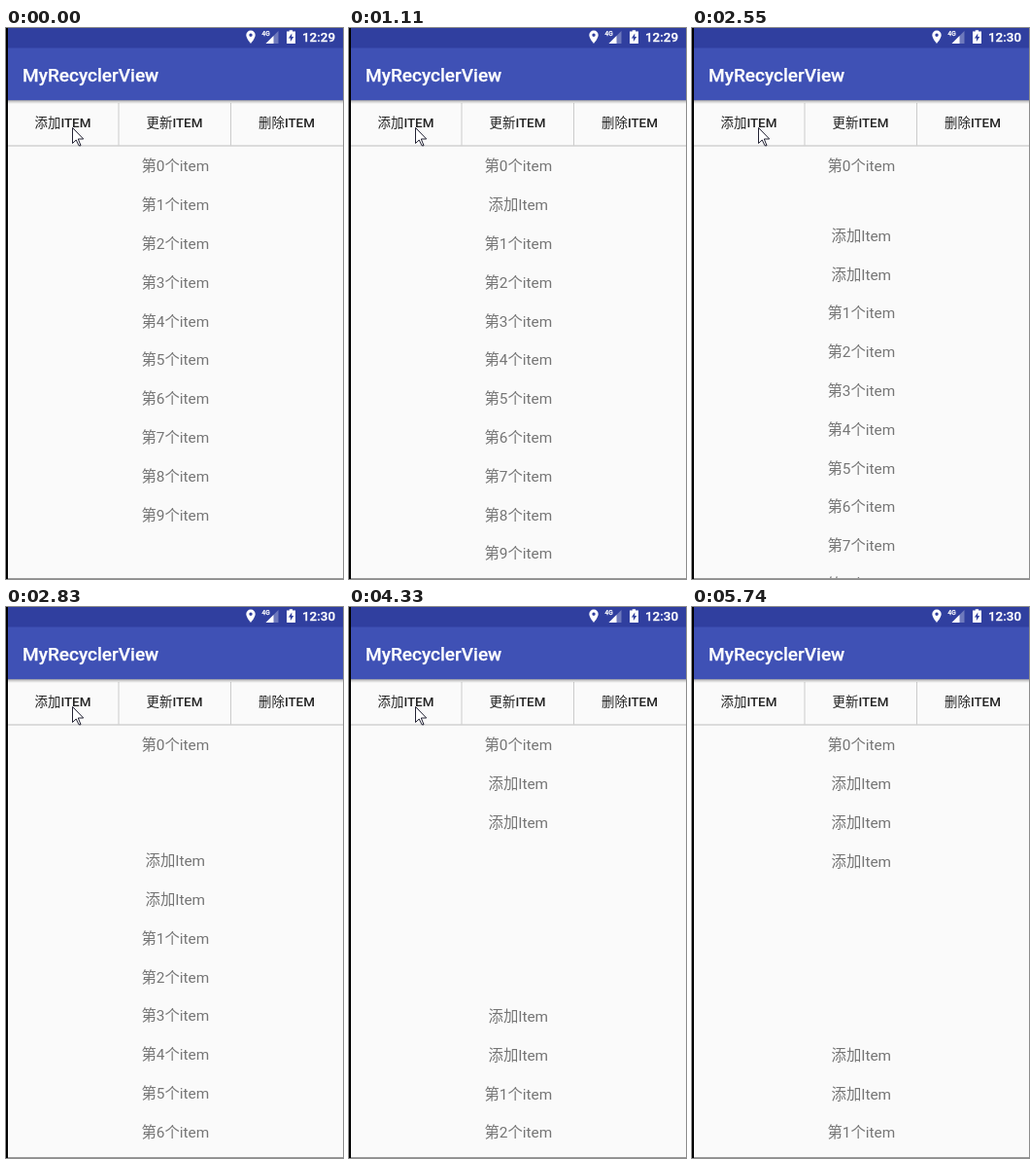
An HTML page that plays this animation: 347x566 px, repeating every 6300 ms.

```html
<!DOCTYPE html>
<html lang="zh-CN">
<head>
<meta charset="utf-8">
<style>
  html, body { margin: 0; width: 347px; height: 566px; overflow: hidden; background: #fafafa; }
  svg { display: block; font-family: Roboto, "Noto Sans CJK SC", "Noto Sans CJK", sans-serif; }
  .bar { fill: #fff; font-weight: 500; }
  .bar text { stroke: #fff; stroke-width: .25; }
  .button { font-size: 13.4px; fill: #222; text-anchor: middle; }
  .button tspan { font-weight: 500; }
  #list { font-size: 15.36px; fill: #757575; text-anchor: middle; }
</style>
</head>
<body>
<svg width="347" height="566" viewBox="0 0 347 566">
  <defs>
    <linearGradient id="shadow" x2="0" y2="1">
      <stop stop-opacity=".3"/>
      <stop offset="1" stop-opacity="0"/>
    </linearGradient>
  </defs>
  <rect width="347" height="566" fill="#fafafa"/>
  <g id="list"></g>

  <path d="M116 77v44M231.5 77v44" stroke="#ccc"/>
  <path d="M0 121h347" stroke="#d0d0d0" stroke-width="1.5"/>
  <rect width="347" height="21" fill="#303f9f"/>
  <rect y="20.5" width="347" height="53.7" fill="#3f51b5"/>
  <rect y="74" width="347" height="4" fill="url(#shadow)"/>

  <g class="bar">
    <path fill-rule="evenodd" d="M252 2.6a4.7 4.7 0 0 0-4.7 4.7c0 3.4 4.7 8.7 4.7 8.7s4.7-5.3 4.7-8.7a4.7 4.7 0 0 0-4.7-4.7zm0 3a1.7 1.7 0 1 1 0 3.4 1.7 1.7 0 0 1 0-3.4z"/>
    <path d="M280.5 3v13h-13z" opacity=".3"/>
    <path d="M275.5 8v8h-8z"/>
    <text x="263.5" y="8" font-size="6.5">4G</text>
    <path fill-rule="evenodd" d="M289 3.6h2.7v-1.4h3.4v1.4h2.900v12.400h-9zM294.300 5.500l-3.400 5h2v3.600l3.300-5h-1.900z"/>
    <text id="clock" x="305" y="13.8" font-size="13.4"></text>
    <text x="17" y="55" font-size="19">MyRecyclerView</text>
  </g>
  <g class="button">
    <text x="58.5" y="102.3">添加<tspan>ITEM</tspan></text>
    <text x="173.5" y="102.3">更新<tspan>ITEM</tspan></text>
    <text x="289" y="102.3">删除<tspan>ITEM</tspan></text>
  </g>

  <path d="M0 565.5h347" stroke="#999"/>
  <rect width="2" height="566"/>
  <path id="cursor" d="M0 0v16l3.7-3.5 2.8 5.800h2l-2.700-6.800h5.400z" fill="#fff" stroke="#223" stroke-linejoin="round"/>
</svg>
<script>
const LOOP = 6300;
const ROW = 39.8;
const FIRST_BASELINE = 147.4;
const MOVE = 250;
const FADE = 120;

// Each tap inserts a row below the first one.
const TAPS = [695, 1550, 2375, 2580, 2810, 2880, 2950, 3842, 5303];
// The screen refreshes every TICK, counted from the latest of these times.
const TICK = 130;
const REFRESH = [0, 710, 1570, 2420, 3910, 4890, 5320];
const CURSOR_MOVES = 4830;
const CURSOR_LEAVES = 5450;

const $ = id => document.getElementById(id);
const clamp = x => Math.min(1, Math.max(0, x));
const ease = x => .5 - Math.cos(Math.PI * clamp(x)) / 2;

// How many rows the taps from index first onward have pushed the list down.
const shiftFrom = (first, t) =>
  TAPS.slice(first).reduce((sum, tap) => sum + ease((t - tap) / MOVE), 0);

// A row stays blank if the next tap interrupts its animation.
function opacityOf(i, t) {
  const interrupted = TAPS[i + 1] - TAPS[i] < MOVE + FADE;
  return interrupted ? 0 : clamp((t - TAPS[i] - MOVE) / FADE);
}

function addRow(label) {
  const text = document.createElementNS("http://www.w3.org/2000/svg", "text");
  text.setAttribute("x", 174.3);
  text.textContent = label;
  $("list").append(text);
  return text;
}

function place(text, row, opacity = 1) {
  text.setAttribute("y", FIRST_BASELINE + row * ROW);
  text.setAttribute("opacity", opacity);
}

const numbered = Array.from({ length: 10 }, (_, i) => addRow(`第${i}个item`));
const inserted = TAPS.map(() => addRow("添加Item"));

function draw(now) {
  const time = now % LOOP;
  const start = REFRESH.findLast(refresh => refresh <= time);
  const t = time - (time - start) % TICK;

  const shift = shiftFrom(0, t);
  numbered.forEach((text, i) => place(text, i && i + shift));
  inserted.forEach((text, i) => place(text, 1 + shiftFrom(i + 1, t), opacityOf(i, t)));

  const swing = 6.7 * Math.sin(Math.PI * Math.max(0, t - CURSOR_MOVES) / 360);
  $("cursor").setAttribute("transform", `translate(68.5 ${102.5 + swing})`);
  $("cursor").setAttribute("opacity", t < CURSOR_LEAVES ? 1 : 0);
  $("clock").textContent = t < REFRESH[2] ? "12:29" : "12:30";
  requestAnimationFrame(draw);
}
draw(performance.now());
</script>
</body>
</html>
```
